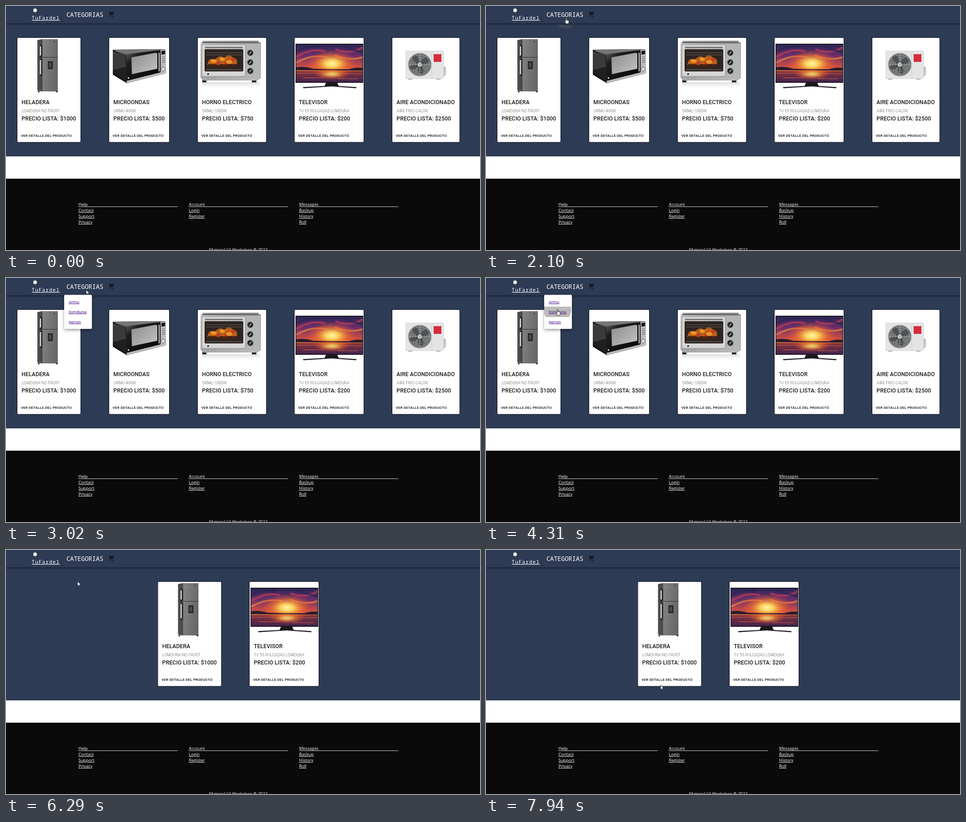
Animation, 1043 px wide and 537 px high, one loop 8 s. Source, as an HTML page:

```html
<!DOCTYPE html>
<html lang="es">
<head>
<meta charset="utf-8">
<title>Tienda</title>
<style>
html, body { margin: 0; width: 100%; height: 100%; overflow: hidden; background: #fff; }
svg { display: block; width: 100%; height: 100%; }
text { white-space: pre; }
.mono { font: 500 13.5px "Noto Sans Mono", monospace; fill: #fff; }
.brand { font-size: 11px; letter-spacing: 1.1px; text-decoration: underline; }
.title { font: 500 12.2px Roboto, sans-serif; letter-spacing: .09px; fill: #1b1b1b; }
.sub { font: 300 8.6px Roboto, sans-serif; letter-spacing: .09px; fill: #555; }
.more { font: 500 7.85px Roboto, sans-serif; letter-spacing: .22px; fill: #111; }
.foot { font: 9.35px "Open Sans", sans-serif; fill: #fff; }
.link { text-decoration: underline; }
.item { font: 9.84px Roboto, sans-serif; letter-spacing: .09px; fill: #551a8b; text-decoration: underline; }
.tip-text { font: 500 6.7px Roboto, sans-serif; fill: #fff; text-anchor: middle; }
.frame { fill: #fff; stroke: #05070c; }
.panel { fill: #fff; filter: drop-shadow(0 3px 3px rgba(0,0,0,.38)); }

.card, .cursor, .arrow, .hand, .tip, .menu, .ripple, .press { animation: 8s linear infinite; }
.gone { animation-name: gone; animation-timing-function: step-end; }
.kept { animation-name: shift; animation-timing-function: step-end; }
.cursor { animation-name: travel; }
.arrow { animation-name: arrow; animation-timing-function: step-end; }
.hand { animation-name: hand; animation-timing-function: step-end; }
.tip { animation-name: tip; transform-origin: 174px 41px; }
.menu { animation-name: menu; transform-origin: 158px 37px; }
.ripple { animation-name: ripple; transform-origin: 157px 69px; }
.press { animation-name: press; transform-origin: 176px 26px; }

@keyframes gone { 0% { opacity: 1 } 78.625%, 100% { opacity: 0 } }
@keyframes shift { 0% { transform: none } 78.625%, 100% { transform: translateX(var(--dx)) } }
@keyframes travel {
  0% { opacity: 0; transform: translate(799px, 490px); animation-timing-function: step-end }
  4.75% { opacity: 1; transform: translate(799px, 490px); animation-timing-function: steps(3, end) }
  7.25% { transform: translate(406px, 315px) }
  12.125% { transform: translate(406px, 315px); animation-timing-function: steps(7, jump-both) }
  18% { transform: translate(170px, 118px) }
  22.875% { transform: translate(170px, 118px); animation-timing-function: steps(3, jump-both) }
  25.4% { transform: translate(176.5px, 26px) }
  38.875% { transform: translate(176.5px, 26px); animation-timing-function: steps(2, jump-both) }
  40.375% { transform: translate(168px, 50px) }
  41.125% { transform: translate(168px, 50px); animation-timing-function: steps(4, jump-both) }
  44.5% { transform: translate(157.5px, 69px) }
  89.5% { transform: translate(157.5px, 69px); animation-timing-function: steps(12, jump-both) }
  99.25%, 100% { opacity: 1; transform: translate(384px, 297px) }
}
@keyframes arrow {
  0% { opacity: 1 } 25.4% { opacity: 0 } 32% { opacity: 1 }
  40.375% { opacity: 0 } 59.5% { opacity: 1 } 98.4% { opacity: 0 } 99.25%, 100% { opacity: 1 }
}
@keyframes hand {
  0% { opacity: 0 } 25.4% { opacity: 1 } 32% { opacity: 0 }
  40.375% { opacity: 1 } 59.5% { opacity: 0 } 98.4% { opacity: 1 } 99.25%, 100% { opacity: 0 }
}
@keyframes tip {
  0% { opacity: 0; transform: scale(.75, .5625); animation-timing-function: step-end }
  26.25% { opacity: .2; transform: scale(.75, .5625); animation-timing-function: ease-in }
  28%, 30.4% { opacity: .92; transform: none }
  32.8%, 100% { opacity: 0; transform: scale(.75, .5625) }
}
@keyframes menu {
  0%, 31% { opacity: 0; transform: scale(.75, .5625); animation-timing-function: ease-out }
  34%, 54.6% { opacity: 1; transform: none }
  56.125%, 100% { opacity: 0; transform: scale(.75, .5625) }
}
@keyframes ripple {
  0% { opacity: 0; transform: scale(.1); animation-timing-function: step-end }
  50.5% { opacity: .27; transform: scale(.15); animation-timing-function: ease-out }
  53.9% { opacity: .27; transform: scale(1) }
  56.125%, 100% { opacity: 0; transform: scale(1.15) }
}
@keyframes press {
  0% { opacity: 0; transform: scale(.1); animation-timing-function: step-end }
  30.375% { opacity: .14; transform: scale(.2) }
  33% { opacity: .1; transform: scale(1) }
  36%, 100% { opacity: 0; transform: scale(1.1) }
}
</style>
</head>
<body>
<svg viewBox="0 0 1043 537">
  <defs>
    <linearGradient id="shade" x2="0" y2="1">
      <stop stop-opacity=".38"/><stop offset="1" stop-opacity="0"/>
    </linearGradient>
    <linearGradient id="steel" x2="1" y2=".3">
      <stop stop-color="#858486"/><stop offset="1" stop-color="#69676a"/>
    </linearGradient>
    <linearGradient id="silver" x2="1" y2="1">
      <stop stop-color="#c9c9c9"/><stop offset=".5" stop-color="#a5a5a5"/><stop offset="1" stop-color="#bcbcbc"/>
    </linearGradient>
    <linearGradient id="glass" x2="1" y2="1">
      <stop stop-color="#6d6d6d"/><stop offset=".25" stop-color="#1d1d1d"/><stop offset="1" stop-color="#050505"/>
    </linearGradient>
    <linearGradient id="mesh" x2="1" y2="1">
      <stop stop-color="#8d8d8d"/><stop offset="1" stop-color="#c4c4c4"/>
    </linearGradient>
    <linearGradient id="sky" x2="0" y2="1">
      <stop stop-color="#2a2558"/><stop offset=".3" stop-color="#6d2f6b"/><stop offset=".6" stop-color="#d1503f"/>
      <stop offset=".68" stop-color="#d9722f"/><stop offset=".72" stop-color="#7d3340"/><stop offset="1" stop-color="#43234f"/>
    </linearGradient>
    <radialGradient id="sun">
      <stop stop-color="#fff6b0"/><stop offset=".25" stop-color="#ffd75a" stop-opacity=".95"/>
      <stop offset=".6" stop-color="#f5742d" stop-opacity=".6"/><stop offset="1" stop-color="#d8433d" stop-opacity="0"/>
    </radialGradient>
    <linearGradient id="mirror" x2="0" y2="1">
      <stop stop-color="#999" stop-opacity=".35"/><stop offset="1" stop-color="#fff" stop-opacity="0"/>
    </linearGradient>
    <clipPath id="screen"><rect x="638.5" y="85" width="146" height="82"/></clipPath>
    <clipPath id="row"><rect x="128" y="63.5" width="61" height="22"/></clipPath>
    <clipPath id="button"><rect x="126" y="5" width="87" height="28"/></clipPath>

    <g id="fridge">
      <path d="M69 75L79 73V188L69 186Z" fill="#4c4b4d"/>
      <rect x="79" y="73" width="35" height="115" fill="url(#steel)"/>
      <path d="M69 113H114M79.3 73V188" stroke="#2b2a2c" stroke-width="1.1"/>
      <path d="M75 85L79 88V109L75 112M75 116L79 118V151L75 155" fill="none" stroke="#222" stroke-width="2.2"/>
      <path d="M75.8 89V109M75.8 119V150" stroke="#ddd" stroke-width="2.4"/>
      <rect x="92" y="121.5" width="11" height="17.5" fill="#29282b"/>
      <rect x="94.5" y="125" width="5.5" height="10" fill="#4b4a4e"/>
      <path d="M70 188.5h4M110 188.5h4" stroke="#222" stroke-width="2.5"/>
      <rect x="105" y="77.5" width="2.5" height="2.5" fill="#333"/>
    </g>

    <g id="micro">
      <path d="M235 96L352 95V148L266 170L235 151Z" fill="#161616"/>
      <path d="M235 96L352 95L350 98L264 110Z" fill="#777"/>
      <path d="M264 106L340 97V147L266 165Z" fill="url(#glass)"/>
      <path d="M276 113L329 103Q333 103 333 107V138L277 150Z" fill="url(#mesh)"/>
      <path d="M235 98L264 107L266 164L235 147Z" fill="#202020"/>
      <path d="M235 100L262 107L264 134L235 141Z" fill="#3b3b3b"/>
      <path d="M265 165L352 143V148L266 170Z" fill="#b9b9b9"/>
      <path d="M340 97L352 95V147L340 150Z" fill="#bcbcbc"/>
      <path d="M342 99l8-1v8l-8 1z" fill="#161616"/>
      <path d="M343 112h7m-7 4h7m-7 4h7m-7 4h7" stroke="#777" stroke-width="1.4"/>
      <circle cx="346" cy="139" r="4.2" fill="#ddd" stroke="#555"/>
      <path d="M337 103V144" stroke="#e5e5e5" stroke-width="2"/>
      <rect x="268" y="157" width="3" height="3" fill="#ddd"/>
    </g>

    <g id="oven">
      <rect x="432" y="168" width="126" height="16" fill="url(#mirror)"/>
      <path d="M432 160h9v8h-9zM541 160h10v8h-10z" fill="#262626"/>
      <path d="M433 76H554L561 81V159L553 164H434L428 158V82Z" fill="url(#silver)"/>
      <path d="M434 78H553L558 82H431Z" fill="#6f6f6f"/>
      <rect x="431" y="85" width="96" height="70" rx="2" fill="#d5d5d5" stroke="#888"/>
      <rect x="437" y="95" width="85" height="49" rx="2" fill="#2c2521"/>
      <path d="M439 103H520M439 108H520" stroke="#7c736d" stroke-width=".8"/>
      <path d="M443 130Q445 112 460 118Q470 106 480 114Q491 104 500 114Q511 116 508 130Z" fill="#b85c1b"/>
      <path d="M443 128h67l-6 7H451Z" fill="#402318"/>
      <g fill="#e99428"><ellipse cx="457" cy="121" rx="7" ry="4"/><ellipse cx="476" cy="117" rx="6" ry="4"/><ellipse cx="491" cy="123" rx="7" ry="4"/></g>
      <g fill="#c43b20"><circle cx="467" cy="126" r="4"/><circle cx="500" cy="117" r="4"/><circle cx="483" cy="126" r="3"/></g>
      <path d="M438 91H521" stroke="#555" stroke-width="3.5"/>
      <path d="M438 90H521" stroke="#f0f0f0" stroke-width="1.2"/>
      <path d="M440 140H518" stroke="#8a8079"/>
      <rect x="528" y="84" width="30" height="75" fill="#b5b5b5"/>
      <g fill="#222" stroke="#777"><circle cx="537.5" cy="103" r="6.5"/><circle cx="537.5" cy="124" r="6.5"/><circle cx="537.5" cy="143" r="6.5"/></g>
      <path d="M535 106l5-6M535 127l5-6M535 146l5-6" stroke="#ddd" stroke-width="1.3"/>
      <rect x="443" y="148" width="3.5" height="3.5" fill="#222"/>
    </g>

    <g id="tv">
      <rect x="637" y="83" width="149" height="86" fill="#17151d"/>
      <g clip-path="url(#screen)">
        <rect x="638" y="85" width="148" height="83" fill="url(#sky)"/>
        <g fill="none" stroke-linecap="round">
          <path d="M640 111Q670 93 700 99M727 96Q758 108 786 90" stroke="#c03c57" stroke-width="5" opacity=".65"/>
          <path d="M640 124Q672 106 705 112M725 109Q758 122 786 112" stroke="#f18a3b" stroke-width="4" opacity=".65"/>
          <path d="M640 99Q665 86 690 91M745 90Q765 98 786 103" stroke="#28234f" stroke-width="5" opacity=".6"/>
        </g>
        <ellipse cx="717" cy="127" rx="58" ry="31" fill="url(#sun)"/>
        <path d="M638 141V135Q655 132 675 138L712 139H755Q770 134 786 136V142Z" fill="#271c31"/>
        <ellipse cx="717" cy="150" rx="40" ry="13" fill="url(#sun)" opacity=".75"/>
        <path d="M640 148H690M742 149H784M655 158H700M730 160H776" stroke="#d35c3f" stroke-width="2" opacity=".55"/>
      </g>
      <path d="M704 169H729L732 176L771 178.5V181L717 177L654 181V178.5L701 176Z" fill="#1a1a1d"/>
    </g>

    <g id="air">
      <path d="M963 134h4q2 8 0 18l-5 3z" fill="#c6c6c5" stroke="#aaa" stroke-width=".6"/>
      <path d="M885 157h9v5h-9zM947 157h9v5h-9z" fill="#aaa"/>
      <path d="M880 99H960L963 103V157L959 160H880Z" fill="#e4e4e2" stroke="#c3c3c1" stroke-width=".7"/>
      <path d="M937 100V159" stroke="#c9c9c7"/>
      <circle cx="910.5" cy="129" r="25.5" fill="#6d7071" stroke="#bcbebd" stroke-width="1.5"/>
      <path d="M910 129Q891 122 896 111Q910 105 910 129Q918 107 930 117Q934 129 910 129Q925 142 914 150Q901 148 910 129Q895 147 888 136Q889 127 910 129" fill="#45484a"/>
      <g fill="none" stroke="#aeb0af" stroke-width=".6"><circle cx="910.5" cy="129" r="21"/><circle cx="910.5" cy="129" r="16"/><circle cx="910.5" cy="129" r="11"/></g>
      <circle cx="910.5" cy="129" r="5" fill="#bdbfbe"/>
      <path d="M885 129h51M910.5 104v50" stroke="#b5b7b6" stroke-width=".8"/>
      <rect x="941" y="106" width="17" height="17" fill="#d42a3c"/>
    </g>
  </defs>

  <rect width="1043" height="331" fill="#2e3b55"/>
  <rect y="38" width="1043" height="5" fill="url(#shade)"/>
  <rect y="331" width="1043" height="49" fill="#fff"/>
  <rect y="380" width="1043" height="157" fill="#0a0a0a"/>

  <circle cx="64" cy="9.5" r="4" fill="#fff"/>
  <text class="mono brand" x="56.5" y="30">TuFardel</text>
  <g clip-path="url(#button)"><circle class="press" cx="176" cy="26" r="45" fill="#fff"/></g>
  <text class="mono" x="133" y="24.3">CATEGORIAS</text>
  <path transform="translate(224.3 10.8) scale(.615)" fill="#14171d" d="M7 18c-1.1 0-1.99.9-1.99 2S5.9 22 7 22s2-.9 2-2-.9-2-2-2zM1 2v2h2l3.6 7.59-1.35 2.45c-.16.28-.25.61-.25.96 0 1.1.9 2 2 2h12v-2H7.42c-.14 0-.25-.11-.25-.25l.03-.12.9-1.63h7.45c.75 0 1.41-.41 1.75-1.03l3.58-6.49c.08-.14.12-.31.12-.48 0-.55-.45-1-1-1H5.21l-.94-2H1zm16 16c-1.1 0-1.99.9-1.99 2s.89 2 1.99 2 2-.9 2-2-.9-2-2-2z"/>

  <g id="cards"></g>
  <g id="footer"></g>

  <g class="tip">
    <rect x="152.5" y="41" width="43" height="14" rx="2.5" fill="#616161"/>
    <text class="tip-text" x="174" y="50.3">Categorias</text>
  </g>

  <g class="menu">
    <rect class="panel" x="128" y="37" width="61" height="75" rx="2.5"/>
    <g clip-path="url(#row)"><circle class="ripple" cx="157" cy="69" r="30.5"/></g>
    <text class="item" x="138" y="55.5">ormu</text>
    <text class="item" x="138" y="77.5">lomduna</text>
    <text class="item" x="138" y="99.5">pevun</text>
  </g>

  <g class="cursor" fill="#fff" stroke="#111" stroke-width=".8" stroke-linejoin="round">
    <path class="arrow" d="M0 0V10L2.3 8L3.8 11.4L5.4 10.7L3.9 7.4H7Z"/>
    <path class="hand" d="M-1 8.5V1a1 1 0 0 1 2 0v4l4 .9q1 .3 1 1.4l-.7 3.4V13H-1.2v-1.8L-3.9 8q-.4-1 .5-1.3 1 .1 2.4 1.8z"/>
  </g>
</svg>
<script>
const products = [
  { art: 'fridge', x: 24, w: 141, name: 'HELADERA', info: 'LOMDUNA NO FROST', price: 1000, dx: 309.5 },
  { art: 'micro', x: 226, w: 134, name: 'MICROONDAS', info: 'ORMU 400W', price: 500 },
  { art: 'oven', x: 421, w: 152.5, name: 'HORNO ELECTRICO', info: 'ORMU 1000W', price: 750 },
  { art: 'tv', x: 634, w: 154, name: 'TELEVISOR', info: 'TV 55 PULGADAS LOMDUNA', price: 200, dx: -99 },
  { art: 'air', x: 849, w: 150, name: 'AIRE ACONDICIONADO', info: 'AIRE FRIO CALOR', price: 2500 }
];
const columns = [
  [159.5, 'Help', 'Contact', 'Support', 'Privacy'],
  [402.3, 'Account', 'Login', 'Register'],
  [645, 'Messages', 'Backup', 'History', 'Roll']
];

const text = (cls, x, y, s) => `<text class="${cls}" x="${x}" y="${y}">${s}</text>`;

const card = ({ art, x, w, name, info, price, dx }) =>
  `<g class="card ${dx ? 'kept' : 'gone'}" style="--dx:${dx || 0}px">
    <rect class="frame" x="${x + .5}" y="69.5" width="${w - 1}" height="230.5" rx="2.5"/>
    <use href="#${art}"/>` +
    text('title', x + 10.3, 216, name) +
    text('sub', x + 10.5, 234, info) +
    text('title', x + 10.3, 251.8, 'PRECIO LISTA: $' + price) +
    text('more', x + 8.7, 288, 'VER DETALLE DEL PRODUCTO') + '</g>';

const column = ([x, head, ...links]) =>
  text('foot', x, 439.5, head) +
  `<rect x="${x}" y="441.2" width="218.3" height="1" fill="#ddd"/>` +
  links.map((s, i) => text('foot link', x, 453 + i * 12.9, s)).join('');

document.getElementById('cards').innerHTML = products.map(card).join('');
document.getElementById('footer').innerHTML =
  columns.map(column).join('') + text('foot', 447, 540, 'Material UI Workshop ® 2022');
</script>
</body>
</html>
```
